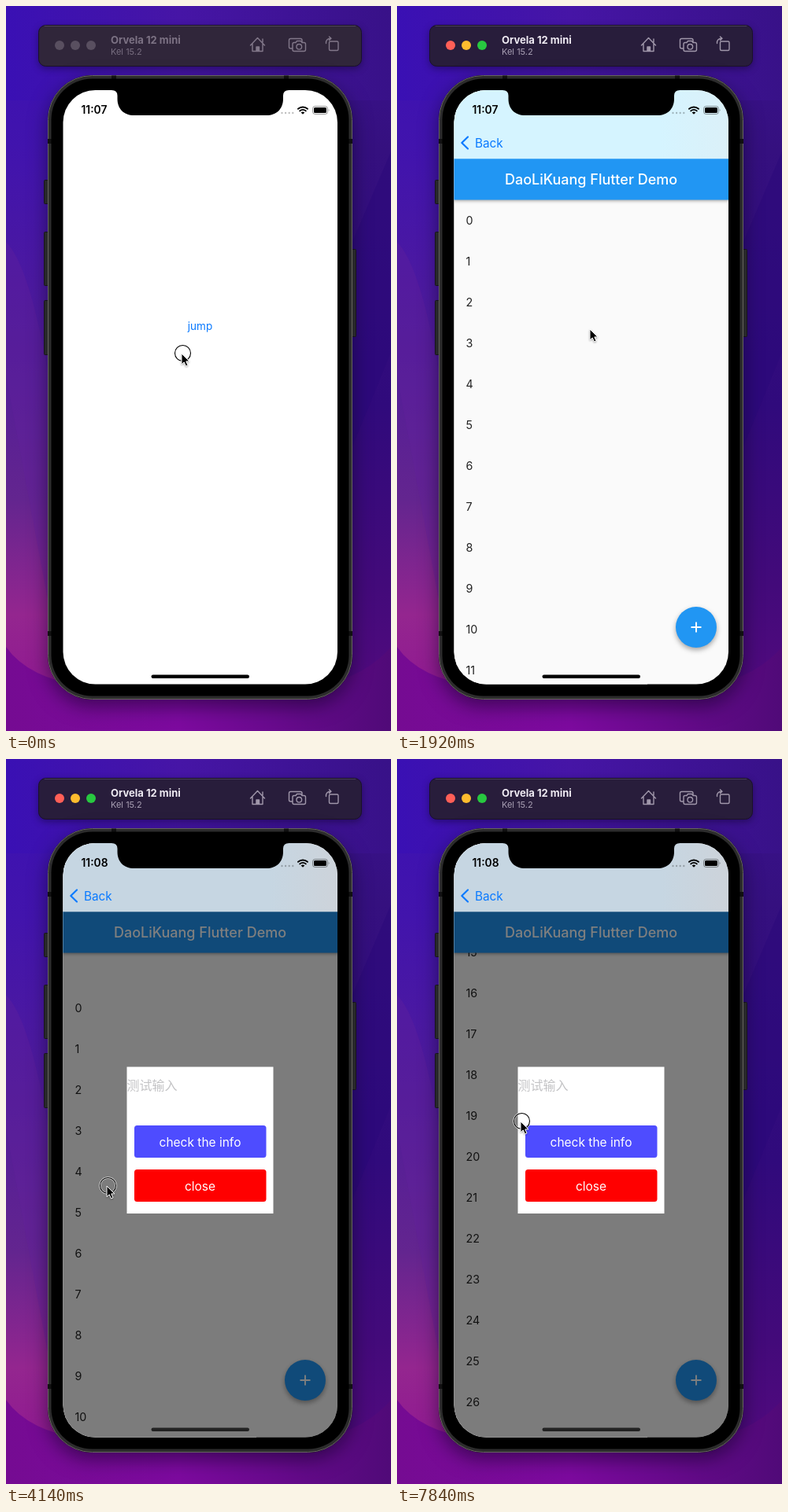
Animation of 489 by 922 pixels, one loop 7.99 s. Source, as an HTML page:

```html
<!DOCTYPE html>
<html lang="en">
<head>
<meta charset="utf-8">
<style>
html, body { margin: 0; width: 100%; height: 100%; overflow: hidden; background: #3a0c8c; }
svg { display: block; width: 489px; height: 922px; }
text { font-family: Inter, Roboto, sans-serif; }
.mid { text-anchor: middle; }
.line { fill: none; stroke-linejoin: round; stroke-linecap: round; }
#phoneShadow { filter: drop-shadow(0 9px 12px rgba(5, 0, 25, .5)); }
#bar { filter: drop-shadow(0 3px 5px rgba(5, 0, 25, .4)); }
#fab { filter: drop-shadow(0 3px 3px rgba(0, 0, 0, .35)); }
#appBar { filter: drop-shadow(0 1.5px 2px rgba(0, 0, 0, .4)); }
#arrow { filter: drop-shadow(0 1px 1px rgba(0, 0, 0, .35)); }

#bar { --bg: #30263a; --title: #7c7284; --sub: #786e80; --icon: #82788a; }
#bar .light { fill: #594f60; }
#bar.active { --bg: #281d3b; --title: #efebf3; --sub: #a89fb3; --icon: #a097aa; }
#bar.active .light { fill: var(--on); }
</style>
</head>
<body>
<svg viewBox="0 0 489 922">
  <defs>
    <linearGradient id="left" x2="0" y2="1">
      <stop stop-color="#3a10b4"/><stop offset=".22" stop-color="#4214ac"/>
      <stop offset=".45" stop-color="#4f1b9b"/><stop offset=".68" stop-color="#63258f"/>
      <stop offset=".84" stop-color="#94268f"/><stop offset="1" stop-color="#8d1292"/>
    </linearGradient>
    <linearGradient id="right" x2="0" y2="1">
      <stop stop-color="#3b128f"/><stop offset=".2" stop-color="#35107f"/>
      <stop offset=".55" stop-color="#300a7c"/><stop offset=".8" stop-color="#430a7a"/>
      <stop offset="1" stop-color="#560a80"/>
    </linearGradient>
    <linearGradient id="top">
      <stop stop-color="#3a10b4"/><stop offset=".45" stop-color="#4615a6"/>
      <stop offset="1" stop-color="#381188"/>
    </linearGradient>
    <linearGradient id="bottom">
      <stop stop-color="#750b92"/><stop offset=".45" stop-color="#7d0a9f"/>
      <stop offset="1" stop-color="#500a78"/>
    </linearGradient>
    <linearGradient id="nav" x2="1" y2="0">
      <stop offset=".75" id="navA"/><stop offset="1" id="navB"/>
    </linearGradient>
    <clipPath id="screen"><rect x="72.5" y="107" width="348.5" height="755.5" rx="41"/></clipPath>
    <clipPath id="listBox"><rect x="72" y="246" width="350" height="617"/></clipPath>
  </defs>

  <!-- wallpaper -->
  <rect width="245" height="922" fill="url(#left)"/>
  <rect x="245" width="244" height="922" fill="url(#right)"/>
  <rect width="489" height="120" fill="url(#top)"/>
  <path d="M0 300Q30 330 54 470V760L0 470Z" fill="#63209b" opacity=".35"/>
  <path d="M489 185L440 300V560L489 440Z" fill="#2b087b" opacity=".5"/>
  <path d="M0 815Q28 855 100 865H400Q460 850 489 815V922H0Z" fill="url(#bottom)"/>

  <!-- window bar -->
  <g id="bar">
    <rect x="41.5" y="24.5" width="410" height="52" rx="9" fill="var(--bg)" stroke="#1b1228"/>
    <path class="line" d="M49 25.5H444" stroke="#fff" opacity=".15"/>
    <circle class="light" style="--on:#ff5f57" cx="68" cy="50" r="6"/>
    <circle class="light" style="--on:#febc2e" cx="88" cy="50" r="6"/>
    <circle class="light" style="--on:#28c840" cx="108" cy="50" r="6"/>
    <text x="133" y="48" font-size="13" font-weight="700" fill="var(--title)">Orvela 12 mini</text>
    <text x="133" y="62" font-size="11" fill="var(--sub)">Kel 15.2</text>
    <g class="line" stroke="var(--icon)" stroke-width="1.4">
      <path d="M310.5 50L319.5 40.5L328.5 50M313 48V57.500H326V48M326 46V42"/>
      <path d="M318 57V52H321.500V57Z" fill="var(--icon)"/>
      <rect x="359.500" y="41.500" width="16.500" height="12.500" rx="2"/>
      <path d="M366 46.500H368L369.500 44.500H374.500L376 46.500H378.500Q380.500 46.500 380.500 48.500V55.500Q380.500 57.500 378.500 57.500H366Q364 57.500 364 55.500V48.500Q364 46.500 366 46.500Z" fill="var(--bg)"/>
      <circle cx="372.300" cy="51.800" r="3.300"/>
      <rect x="410.500" y="45" width="11.500" height="11.500" rx="1.500"/>
      <path d="M406.500 47.500Q406 41.500 412.500 41.300M410.500 39L413 41.300L410.500 43.600"/>
    </g>
  </g>

  <!-- phone body -->
  <rect id="phoneShadow" x="53" y="88" width="387" height="794" rx="57"/>
  <g fill="#29292b" stroke="#17151b">
    <rect x="48.500" y="221.500" width="6" height="30" rx="1"/>
    <rect x="48.500" y="287.500" width="6" height="68" rx="1"/>
    <rect x="48.500" y="374.500" width="6" height="69" rx="1"/>
    <rect x="438.500" y="309.500" width="6" height="111" rx="1"/>
  </g>
  <rect x="53.500" y="88.500" width="386" height="793" rx="56" fill="#2c2c2c" stroke="#66645f"/>
  <path d="M134 91H140M353 91H359M55.500 169V175M55.500 795V801M437.500 169V175M437.500 795V801" stroke="#111" stroke-width="5"/>
  <rect x="57.500" y="92.500" width="378" height="785" rx="52"/>

  <g clip-path="url(#screen)">
    <g id="home">
      <rect x="72" y="107" width="350" height="756" fill="#fff"/>
      <text id="jump" class="mid" x="246.500" y="411.500" font-size="13.500" fill="#0a7aff">jump</text>
    </g>
    <g id="page">
      <rect x="72" y="107" width="350" height="756" fill="#fafafa"/>
      <g clip-path="url(#listBox)"><g id="list" font-size="14.300" fill="#222"></g></g>
      <rect id="appBar" x="72" y="194" width="350" height="52.500" fill="#2196f3"/>
      <text class="mid" x="246.500" y="227" font-size="18" font-weight="500" fill="#fff">DaoLiKuang Flutter Demo</text>
      <circle id="fab" cx="380" cy="790" r="26" fill="#2196f3"/>
      <path d="M373.500 790H386.500M380 783.500V796.500" stroke="#fff" stroke-width="1.900"/>
      <rect id="dim" x="72" y="194" width="350" height="669" opacity=".5"/>
      <rect x="72" y="107" width="350" height="87.300" fill="url(#nav)"/>
      <path class="line" d="M90 166.500L82.300 174L90 181.500" stroke="#0a7aff" stroke-width="2.200"/>
      <text x="99" y="179.500" font-size="15.300" fill="#0a7aff">Back</text>
    </g>
    <g id="dialog">
      <rect x="153.500" y="391.500" width="186" height="186.500" fill="#fff"/>
      <text x="153.500" y="421" font-size="16" fill="#c3c3c5" style="font-family:'Noto Sans CJK SC','Noto Sans CJK',sans-serif">测试输入</text>
      <rect x="163" y="466" width="167.500" height="41" rx="3.500" fill="#4e4cff"/>
      <rect x="163" y="522" width="167.500" height="41" rx="3.500" fill="#f00"/>
      <g class="mid" font-size="15.500" fill="#fff">
        <text x="246.500" y="492.500">check the info</text>
        <text x="246.500" y="548.500">close</text>
      </g>
    </g>

    <!-- status bar and home indicator -->
    <text id="clock" x="95.500" y="137.300" font-size="13.800" font-weight="600"></text>
    <path class="line" d="M350.500 136H364.500" stroke="#000" stroke-width="2.400" stroke-dasharray="0 4.600" opacity=".25"/>
    <path class="line" d="M371 130.800A9 9 0 0 1 383 130.800M373.200 133.400A5.800 5.800 0 0 1 380.800 133.400" stroke="#000" stroke-width="1.900"/>
    <path d="M377 137.800L374.700 135.500A3.300 3.300 0 0 1 379.300 135.500Z"/>
    <rect x="389.500" y="127.500" width="19" height="10" rx="3" fill="none" stroke="#000" opacity=".4"/>
    <rect x="391" y="129" width="16" height="7" rx="1.600"/>
    <path d="M409.800 130.800Q411.500 132.500 409.800 134.200Z" opacity=".45"/>
    <rect id="grip" x="184.500" y="850.500" width="124.500" height="4.500" rx="2.250"/>
  </g>
  <path d="M134 106.500V107Q141.500 107 141.500 114V118C141.500 131 150 139 162.500 139H331C343.500 139 352 131 352 118V114Q352 107 359.500 107V106.500Z"/>

  <g id="pointer">
    <g id="ring" fill="none">
      <circle cx="1.500" cy="-.5" r="10" stroke="#fff" stroke-width="2.600" opacity=".7"/>
      <circle cx="1.500" cy="-.5" r="10" stroke="#000" stroke-width="1.100"/>
    </g>
    <path id="arrow" d="M0 0V13.800L3.200 10.900L5.500 16L8 14.900L5.800 9.900H10Z" stroke="#fff" stroke-width="1"/>
  </g>
</svg>

<script>
const LOOP = 7990, TICK = 148;   // the screen refreshes once per tick
const $ = id => document.getElementById(id);

// tick, x, y, button down
const POINTER = [
  [0, 223, 442, 1], [1, 223, 442, 0], [2, 226, 437, 0], [7, 245, 411, 0],
  [18, 245, 411, 0], [21, 160, 430, 0], [22, 148, 445, 1], [25, 133, 515, 1],
  [27, 128, 541, 1], [28, 128, 543, 1], [31, 152, 465, 0], [34, 134, 535, 0],
  [36, 133, 540, 1], [38, 160, 460, 0], [40, 138, 535, 1], [41, 160, 462, 1],
  [42, 141, 482, 0], [44, 135, 500, 0], [45, 135, 500, 0], [49, 132, 503, 0],
  [50, 133, 508, 1], [53, 157, 461, 1]
];
// tick, scroll offset
const SCROLL = [
  [22, 0], [25, -32], [28, -44], [29, -20], [30, 25], [31, 75], [32, 160],
  [34, 235], [36, 255], [38, 340], [39, 450], [40, 520], [41, 620],
  [42, 775], [43, 799], [44, 807]
];
// tick, progress of the page push
const PUSH = [[9, 0], [10, .3], [11, .84], [12, .98], [13, 1]];

function sample(keys, n) {
  let i = keys.findIndex(k => k[0] > n);
  if (i < 0) i = keys.length;
  const a = keys[Math.max(i - 1, 0)], b = keys[i] || a;
  const f = a === b || n < a[0] ? 0 : (n - a[0]) / (b[0] - a[0]);
  return a.map((v, j) => v + (b[j] - v) * f);
}

const show = (id, on) => $(id).setAttribute("visibility", on ? "visible" : "hidden");
const move = (id, x, y) => $(id).setAttribute("transform", `translate(${x} ${y})`);

$("list").innerHTML = Array.from({ length: 29 }, (_, i) =>
  `<text x="87.500" y="${277.5 + 52 * i}">${i}</text>`).join("");

function draw(n) {
  const [, x, y, down] = sample(POINTER, n);
  const push = sample(PUSH, n)[1], modal = n >= 16;
  $("bar").classList.toggle("active", n > 0);
  $("jump").setAttribute("opacity", n < 8 ? 1 : .2);
  move("home", -104 * push, 0);
  move("page", 348.5 * (1 - push), 0);
  move("list", 0, -sample(SCROLL, n)[1]);
  show("page", push > 0);
  show("dim", modal);
  show("dialog", modal);
  $("navA").setAttribute("stop-color", modal ? "#c6d6e2" : "#d5f4ff");
  $("navB").setAttribute("stop-color", modal ? "#cdd3da" : "#dbf0f8");
  $("grip").setAttribute("fill", modal ? "#222" : "#000");
  $("clock").textContent = n < 27 ? "11:07" : "11:08";
  move("pointer", x, y);
  show("ring", down === 1);
}

function frame() {
  const t = performance.now() % LOOP;
  draw(Math.min(53, Math.floor((t + 16) / TICK)));
  requestAnimationFrame(frame);
}
frame();
</script>
</body>
</html>
```
